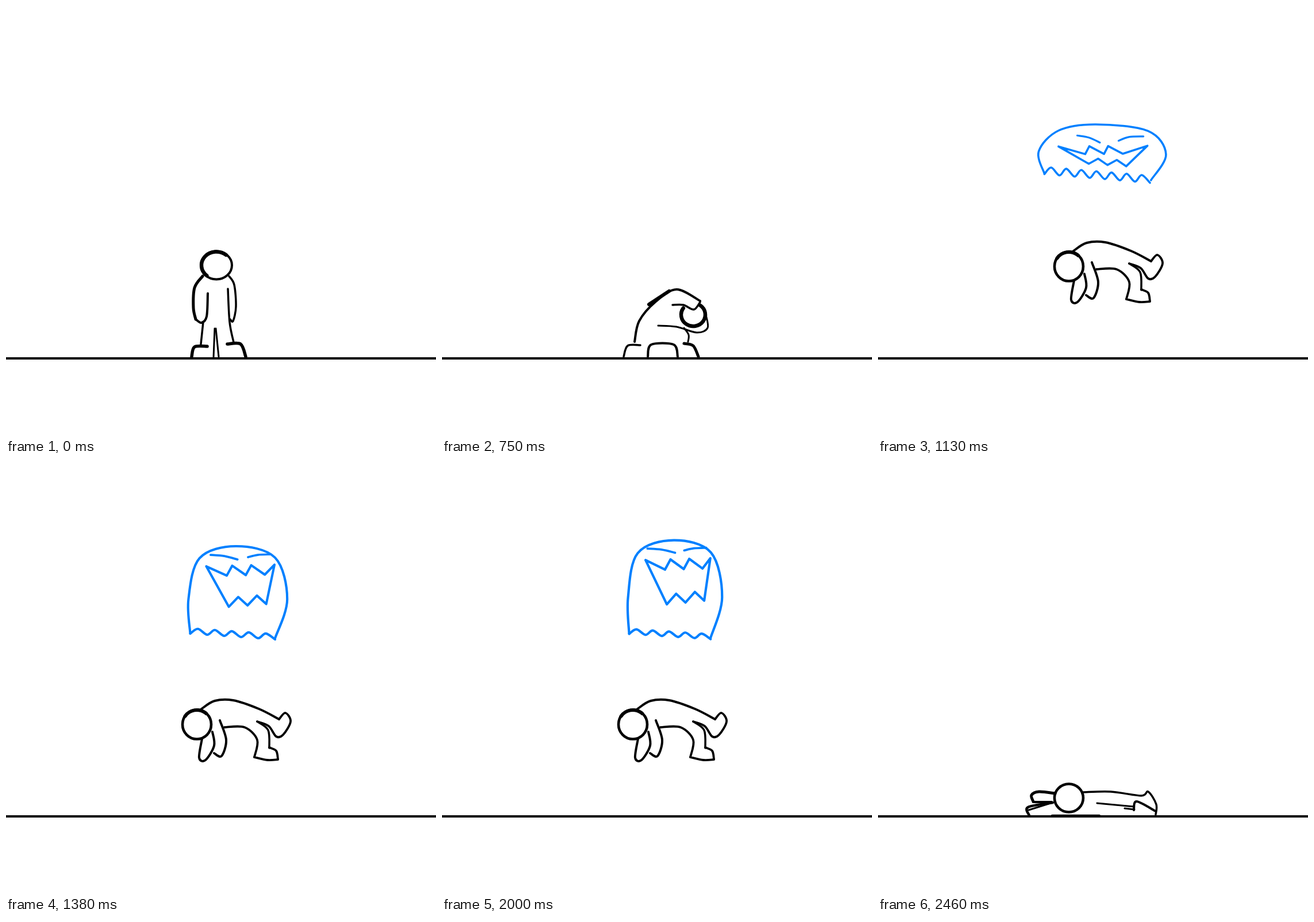
Write an HTML page with a canvas that moves like this. It is 748 by 748 pixels and loops after 3.37 s.

```html
<!DOCTYPE html>
<html lang="en">
<head>
<meta charset="utf-8">
<title>Ghost slam</title>
<style>
html, body { margin: 0; width: 100%; height: 100%; overflow: hidden; background: #fff; }
canvas { display: block; }
</style>
</head>
<body>
<canvas id="stage" width="748" height="748"></canvas>
<script>
const ctx = document.getElementById("stage").getContext("2d");
const LOOP = 3370, FPS = 24, GROUND = 613;
const INK = "#000", BLUE = "#0080ff";
let thin = 1;

// Strokes a path built in pose space; the line width ignores the pose's scale.
function ink(width, build) {
  ctx.beginPath();
  build();
  ctx.save();
  ctx.resetTransform();
  ctx.lineWidth = width * thin;
  ctx.stroke();
  ctx.restore();
}

const pairs = flat => Array.from({ length: flat.length / 2 }, (_, i) => flat.slice(i * 2, i * 2 + 2));
const lerp = (a, b, t) => a + (b - a) * t;
const lerpAll = (a, b, t) => a.map((v, i) => lerp(v, b[i], t));
const along = (from, to, t, dy = 0) => [lerp(from[0], to[0], t), lerp(from[1], to[1], t) + dy];

// Catmull-Rom curve through x, y, x, y, ...
function curve(width, ...flat) {
  const p = pairs(flat);
  ink(width, () => {
    ctx.moveTo(...p[0]);
    for (let i = 1; i < p.length; i++) {
      const a = p[Math.max(i - 2, 0)], b = p[i - 1], c = p[i], d = p[i + 1] || c;
      ctx.bezierCurveTo(b[0] + (c[0] - a[0]) / 6, b[1] + (c[1] - a[1]) / 6,
        c[0] - (d[0] - b[0]) / 6, c[1] - (d[1] - b[1]) / 6, ...c);
    }
  });
}

function polyline(width, points) {
  ink(width, () => points.forEach(p => ctx.lineTo(...p)));
}

// Ellipse arc, clockwise, in degrees
function arc(width, x, y, rx, ry, from = 0, to = 360) {
  ink(width, () => ctx.ellipse(x, y, rx, ry, 0, from * Math.PI / 180, to * Math.PI / 180));
}

// Evenly spaced points that swing to alternate sides of a straight course
const swing = (count, x, y, dx, dy, sx, sy) => Array.from({ length: count }, (_, i) => {
  const side = i % 2 ? -1 : 1;
  return [x + dx * i + sx * side, y + dy * i + sy * side];
});

function pose(color, draw, { dy = 0, sy = 1, base = GROUND } = {}) {
  ctx.save();
  ctx.strokeStyle = color;
  ctx.translate(0, base + dy);
  ctx.scale(1, sy);
  ctx.translate(0, -base);
  draw();
  ctx.restore();
}

function stand() {
  arc(4, 366, 451, 27, 24.5);
  arc(6.5, 366, 451, 26, 23.5, 130, 310);
  curve(5, 342, 470, 328, 490, 326, 525, 330, 545);
  curve(4, 330, 545, 340, 551, 349, 540, 351, 500);
  curve(3.5, 388, 470, 397, 485, 400, 523, 395, 548, 390, 545);
  curve(3.5, 386, 492, 389, 550, 396, 585);
  curve(3.5, 343, 550, 339, 588);
  curve(3, 363, 561, 361, 611);
  curve(3, 365, 561, 370, 610);
  curve(5.5, 350, 592, 328, 593, 323, 610);
  curve(5.5, 385, 588, 408, 588, 417, 610);
}

function crouch() {
  curve(4, 335, 584, 343, 548, 372, 514, 408, 493, 449, 513);
  curve(6, 360, 519, 395, 496);
  curve(3.5, 401, 520, 420, 520, 438, 528, 449, 515);
  arc(6.5, 437, 537, 21, 20, -55, 215);
  curve(3, 459, 537, 462, 560, 443, 568, 408, 558, 376, 556);
  curve(3, 421, 560, 429, 572, 428, 584);
  curve(3.5, 316, 610, 323, 591, 345, 590);
  curve(4, 358, 610, 364, 589, 403, 589, 410, 610);
  curve(5, 421, 587, 437, 591, 446, 610);
}

function hang() {
  arc(4.6, 332, 453, 25, 25.5);
  arc(6, 332, 453, 25, 25, 215, 310);
  curve(4, 340, 426, 363, 412, 395, 411, 440, 426, 475, 444);
  curve(3.8, 475, 444, 486, 433, 495, 448, 482, 471, 470, 474, 457, 456, 437, 448);
  curve(3.5, 437, 448, 456, 463, 458, 494);
  curve(3.8, 458, 493, 470, 499, 473, 513);
  curve(3.8, 473, 514, 455, 515, 432, 510);
  curve(3.8, 432, 510, 437, 480, 415, 458, 380, 458);
  curve(4, 372, 446, 383, 480, 375, 508, 362, 503);
  curve(4, 341, 478, 336, 511, 347, 515, 362, 490, 359, 466);
}

function slam() {
  curve(4, 302, 602, 264, 550, 280, 506, 306, 535, 314, 568);
  curve(4, 300, 602, 267, 540, 282, 523, 303, 580, 341, 605);
  curve(4, 313, 567, 303, 520, 322, 506, 323, 534);
  curve(4, 304, 560, 312, 530, 340, 548, 354, 596);
  curve(4, 288, 590, 320, 607, 400, 612, 430, 612);
  curve(4, 343, 552, 400, 571, 457, 560, 463, 511, 488, 530, 490, 563);
  curve(4, 457, 563, 470, 538);
  curve(4, 442, 581, 475, 555, 493, 577, 470, 610, 430, 612);
  curve(4, 468, 606, 488, 572, 480, 561);
}

function lie() {
  arc(4.6, 332, 581, 25, 24.5);
  curve(5, 308, 573, 280, 570, 267, 576, 270, 587);
  curve(4, 270, 588, 302, 588);
  curve(4.5, 263, 611, 261, 597, 304, 589);
  curve(3, 262, 602, 297, 591);
  curve(3.5, 357, 571, 405, 570, 458, 577, 470, 570, 484, 592, 483, 610);
  curve(4, 445, 602, 450, 587, 483, 604);
  curve(3, 381, 590, 445, 596);
  curve(3, 429, 599, 446, 601);
  curve(4.5, 303, 612, 385, 612);
}

// Sketchy ghost shooting out of the body
function burst() {
  curve(4, 352, 340, 338, 235, 352, 163, 405, 144, 460, 190, 469, 260, 440, 357);
  curve(3, 341, 190, 400, 142, 464, 240);
  curve(3, 337, 220, 342, 260, 355, 335);
  curve(5, 358, 171, 391, 171);
  curve(4, 404, 169, 420, 162, 440, 158);
  polyline(2.5, swing(10, 360, 203, 7, 0, 0, -9));
  curve(3.5, 365, 208, 383, 268);
  polyline(3.2, swing(6, 383, 252, 10, 0, 0, 15));
  curve(3, 444, 187, 446, 215, 434, 264);
  polyline(3.5, swing(14, 364, 317, 6, 1.6, 0, -17));
  for (let x = 332; x < 425; x += 17.5) {
    const away = x - 372;
    curve(2, x, 375, x + away * 0.3, 395, x + away * 0.8, 415 + Math.abs(away) * 0.8);
  }
  curve(2.8, 318, 198, 328, 290, 320, 372);
  curve(2, 319, 320, 318, 380, 295, 399);
  curve(2, 466, 349, 456, 390);
  curve(2.2, 496, 304, 481, 402);
  curve(2.2, 500, 245, 480, 290, 464, 341);
  curve(2, 479, 178, 492, 205, 488, 224);
}

// Laughing ghost: 0 is squashed flat, 1 is tall
function ghost(stretch) {
  const mix = (a, b) => lerp(a, b, stretch);
  const shape = (a, b) => lerpAll(a, b, stretch);
  const width = mix(3.5, 4.1);

  curve(width, ...shape(
    [284, 291, 273, 256, 310, 226, 375, 217, 470, 227, 503, 262, 476, 303],
    [321, 295, 318, 235, 337, 163, 400, 142, 468, 162, 489, 235, 468, 303]));

  const hemLeft = shape([284, 292], [321, 295]), hemRight = shape([474, 308], [468, 305]);
  const waves = Math.max(4, Math.round(mix(7, 5)));
  const hem = [hemLeft];
  for (let i = 0; i < waves; i++) {
    hem.push(along(hemLeft, hemRight, (i + 0.45) / waves, -mix(13, 9)));
    hem.push(along(hemLeft, hemRight, (i + 1) / waves));
  }
  curve(width, ...hem.flat());

  const left = shape([308, 256], [349, 177]), right = shape([469, 255], [467, 174]);
  const lowLeft = shape([363, 279], [388, 248]), lowRight = shape([428, 285], [453, 243]);
  const mouth = [left];
  for (let i = 0; i < 3; i++) {
    const tip = 0.3 + i * mix(0.2, 0.28);
    mouth.push(along(left, right, tip, mix(13, 17)));
    if (i < 2) mouth.push(along(left, right, tip + mix(0.04, 0.08)));
  }
  mouth.push(right);
  for (let i = 0; i < 5; i++) mouth.push(along(lowRight, lowLeft, i / 4, i % 2 ? -mix(9, 16) : 0));
  polyline(width, [...mouth, left]);

  curve(width - 0.4, ...shape([345, 237, 365, 241, 383, 250], [356, 157, 380, 159, 403, 165]));
  curve(width - 0.4, ...shape([418, 247, 436, 240, 462, 239], [421, 161, 438, 157, 460, 156]));
}

function splash() {
  let seed = 7;
  const random = () => (seed = seed * 16807 % 2147483647) / 2147483647;

  for (let i = 0; i < 10; i++) {
    const x = 350 + i * 10, top = 350 + i * 9 + random() * 25;
    curve(3, x, top, x + 1, 480, 334 + i * 13.5, 560 + random() * 28);
  }
  for (let i = 0; i < 5; i++) {
    const x = i % 2 * 60, y = 486 + i * 28;
    curve(2.8, x, y, lerp(x, 330, 0.5), lerp(y, 576, 0.55), 330, 574 + i * 3);
  }
  for (let i = 0; i < 6; i++) {
    const x = 455 - i * 25, endX = 610 + 130 * Math.sin(i * Math.PI / 5), endY = 552 + i * 19;
    curve(2.8, x, 580, lerp(x, endX, 0.5), lerp(580, endY, 0.4), endX, endY);
  }
  curve(2.8, 209, 558, 300, 585, 386, 605);
  curve(2.8, 263, 642, 370, 625, 500, 578);
  curve(2.4, 245, 626, 350, 619, 480, 580);
  curve(2.2, 121, 614, 230, 616, 277, 627);

  curve(2.8, 285, 503, ...swing(9, 250, 499, -26, -28, -38, 0).flat());
  curve(3, 158, 440, 115, 385, 0, 300);
  curve(2.6, 49, 306, 38, 210, 0, 148);
  curve(2.8, ...swing(6, 490, 517, 16, -5, 0, 11).flat());
  curve(2.8, 573, 500, 577, 425, 625, 388, 700, 397, 724, 300);
  curve(3, 503, 522, 553, 470, 615, 465, 660, 385, 729, 243);
  curve(2.8, ...swing(7, 606, 460, 18, -24, 0, 38).flat());
}

const laugh = n => 0.72 - 0.72 * Math.cos((n - 43) / 14.5 * Math.PI * 2);

function render(time) {
  const n = Math.floor((time + 5.5) * FPS / 1000);
  ctx.fillStyle = "#fff";
  ctx.fillRect(0, 0, 748, 748);
  ctx.lineCap = ctx.lineJoin = "round";
  ctx.fillStyle = INK;
  ctx.fillRect(0, GROUND - 2, 748, 4);

  if (n < 16) {
    pose(INK, stand, { sy: 1 - 0.07 * Math.max(0, n - 13) });
  } else if (n < 20) {
    pose(INK, crouch, { sy: 1 - 0.05 * (n - 18) });
  } else if (n < 53) {
    const dive = n === 52;
    const dy = dive ? 21 : 26 / 9 * Math.max(0, 25 - n) ** 2;
    if (n < 24) {
      pose(BLUE, burst, { dy: Math.max(0, dy - 26), sy: Math.min(1, 0.35 + (n - 20) * 0.325), base: 450 });
    } else {
      pose(BLUE, () => ghost(laugh(n)), { dy: dive ? 120 : 0 });
    }
    pose(INK, hang, { dy });
  } else {
    thin = 1 - (n - 53) / 6;
    if (thin > 0) pose(BLUE, splash);
    thin = 1;
    if (n < 56) pose(INK, slam, { sy: 1 - 0.15 * (n - 53) });
    else pose(INK, lie, { sy: 1 + 0.1 * Math.max(0, 58 - n) });
  }
}

const start = performance.now();
function tick() {
  render((performance.now() - start) % LOOP);
  requestAnimationFrame(tick);
}
tick();
</script>
</body>
</html>
```
